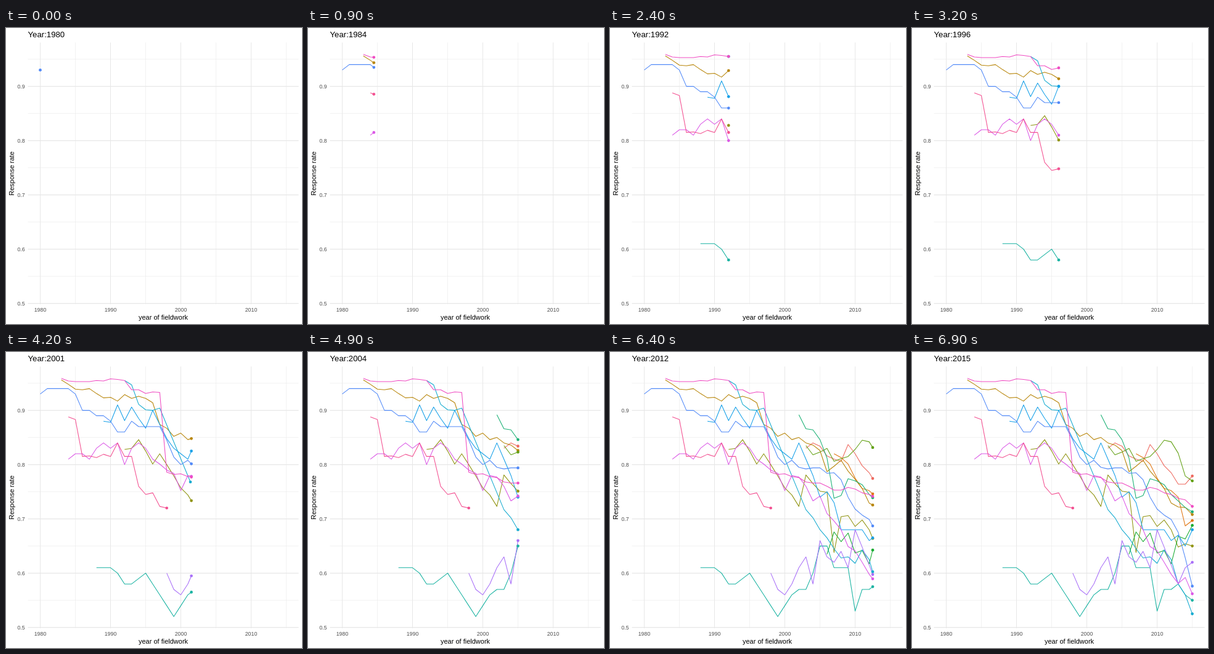
Recreate the animation shown at these times as an HTML page. Size 480 by 480 pixels, loop 10 s.

```html
<!DOCTYPE html>
<html lang="en">
<head>
<meta charset="utf-8">
<title>Response rate by year</title>
<style>
  html, body { margin: 0; width: 100%; height: 100%; overflow: hidden; background: #fff; }
  svg { display: block; width: 100vw; height: 100vh; font-family: "Liberation Sans", Arial, sans-serif; }
  .major { stroke: #e7e7e7; stroke-width: 1.07; }
  .minor { stroke: #e9e9e9; stroke-width: 0.6; }
  .tick { font-size: 8.8px; fill: #4d4d4d; }
  .label { font-size: 11px; text-anchor: middle; }
  .line { fill: none; stroke-width: 1.07; stroke-linejoin: round; }
</style>
</head>
<body>
<svg viewBox="0 0 480 480">
  <g id="grid"></g>
  <g id="lines"></g>
  <g id="dots"></g>
  <text id="title" x="35.5" y="15" font-size="13.2">Year:1980</text>
  <text class="label" x="255" y="473">year of fieldwork</text>
  <text class="label" transform="translate(13 236) rotate(-90)">Response rate</text>
</svg>
<script>
const FIRST = 1980, SPAN = 35, LAST_STEP = 69, STEP_MS = 100, LOOP_MS = 10000;
const PANEL = { left: 35.5, right: 474.5, top: 23.5, bottom: 448 };

const byId = id => document.getElementById(id);
const px = year => 55.5 + (year - FIRST) * 11.4;
const py = rate => 94.6 + (0.9 - rate) * 880;
const stepOf = year => Math.round((year - FIRST) * LAST_STEP / SPAN);

function add(parent, tag, attrs, text = '') {
  const el = document.createElementNS('http://www.w3.org/2000/svg', tag);
  for (const name in attrs) el.setAttribute(name, attrs[name]);
  el.textContent = text;
  return byId(parent).appendChild(el);
}

function gridX(year, kind) {
  const x = px(year);
  add('grid', 'line', { class: kind, x1: x, x2: x, y1: PANEL.top, y2: PANEL.bottom });
}
function gridY(rate, kind) {
  const y = py(rate);
  add('grid', 'line', { class: kind, x1: PANEL.left, x2: PANEL.right, y1: y, y2: y });
}
for (let year = 1985; year <= 2015; year += 10) gridX(year, 'minor');
for (let i = 0; i < 5; i++) gridY(0.55 + i / 10, 'minor');
for (let year = 1980; year <= 2010; year += 10) {
  gridX(year, 'major');
  add('grid', 'text', { class: 'tick', x: px(year), y: 460, 'text-anchor': 'middle' }, year);
}
for (let i = 5; i <= 9; i++) {
  gridY(i / 10, 'major');
  add('grid', 'text', { class: 'tick', x: 30.7, y: py(i / 10) + 3.1, 'text-anchor': 'end' }, (i / 10).toFixed(1));
}

// Rates are yearly, in thousandths; null marks a year without a survey.
const allSeries = [];
function series(color, start, rates) {
  const points = rates
    .map((rate, i) => ({ step: stepOf(start + i), x: px(start + i), y: py(rate / 1000), known: rate !== null }))
    .filter(p => p.known);
  allSeries.push({
    points,
    line: add('lines', 'path', { class: 'line', stroke: color }),
    dot: add('dots', 'circle', { r: 2.35, fill: color })
  });
}

series('#ee6a60', 2003, [830, 840, 834, 816, 810, 806, 837, 820, 798, 785, 764, 764, 779]);
series('#e07612', 2007, [820, 813, 801, 775, 756, 752, 740, 687, 697]);
series('#b8860b', 1983, [956, 948, 939, 938, 940, 931, 923, 924, 917, 929, 922, 926, 922, 914, 874, 867, 852,
  858, 846, 850, 840, 836, 826, 787, 797, 808, 788, 773, 756, 729, 722, 721, 708]);
series('#909412', 1992, [828, 830, 846, 825, 801, 820, 800, 779, 757, 744, 723, 781, 765, 751, 749, 638, 704,
  706, 686, 698, 680, 648, 654, 650]);
series('#62a014', 2003, [835, 818, 823, 830, 806, 811, 815, 828, 845, 842, 821, 779, 770]);
series('#18ab32', 2006, [635, 676, 658, 674, 637, 642, 617, 668, 663, 688]);
series('#1db176', 2002, [892, 866, 864, 846, 812, 738, 743, 774, 770, 763, 745, 733, 721, 713]);
series('#1ab3a2', 1988, [610, 610, 610, 600, 580, 580, 590, 600, 580, 560, 540, 520, 540, 560, 570, 570, 600,
  650, 650, 610, 610, 610, 530, 570, 570, 580, 560, 550]);
series('#16abd0', 1992, [955, 947, 911, 901, 900, 904, null, null, null, null, null, 717, 702, 680, 665, 645,
  628, 630, 618, 643, 625, 580, 560, 525]);
series('#16a0e8', 1989, [880, 878, 910, 881, 906, 885, 867, 900, 874, 848, 830, 820, 810, 840, 810, 780, 740,
  750, 730, 680, 680, 680, 680, 660, 670, 650, 680]);
series('#528af8', 1980, [930, 940, 940, 940, 940, 930, 900, 900, 890, 890, 880, 860, 860, 880, 870, 870, 870,
  870, 845, 814, 800, 808, 795, 792, 794, 794, 784, 785, 772, 740, 718, 707, 699, 675, 628, 576]);
series('#a970f8', 1998, [600, 570, 560, 580, 610, 630, 580, 660, 630, 620, 640, 610, 680, 648, 615, 580, 610, 620]);
series('#db58e6', 1984, [810, 820, 820, 810, 830, 840, 830, 840, 800, 830, 840, 830, 810, 801, 790, 784, 752,
  780, 777, 760, 733, 742, 710, 696, 680, 649, 641, 620, 598, 581, 592, 562]);
series('#ef4cc2', 1983, [959, 954, 953, 953, 953, 955, 954, 958, 957, 955, 938, 938, 931, 934, 933, 786, 782,
  783, 778, 776, 768, 766, 766, 760, 753, 753, 758, 755, 748, 745, 738, 735, 723]);
series('#f35292', 1984, [888, 883, 815, 816, 813, 819, 815, 840, 815, 815, 760, 745, 748, 723, 720]);

function reveal({ points, line, dot }, step) {
  const seen = points.filter(p => p.step <= step);
  dot.style.display = line.style.display = seen.length ? '' : 'none';
  if (!seen.length) return;
  let head = seen[seen.length - 1];
  const next = points[seen.length];
  if (next && step > head.step) {
    const f = (step - head.step) / (next.step - head.step);
    head = { x: head.x + (next.x - head.x) * f, y: head.y + (next.y - head.y) * f };
    seen.push(head);
  }
  line.setAttribute('d', 'M' + seen.map(p => `${p.x.toFixed(2)} ${p.y.toFixed(2)}`).join('L'));
  dot.setAttribute('cx', head.x);
  dot.setAttribute('cy', head.y);
}

let shown = -1;
function draw() {
  const step = Math.min(LAST_STEP, Math.floor(performance.now() % LOOP_MS / STEP_MS));
  if (step !== shown) {
    shown = step;
    byId('title').textContent = 'Year:' + Math.floor(FIRST + SPAN * step / LAST_STEP);
    allSeries.forEach(s => reveal(s, step));
  }
  requestAnimationFrame(draw);
}
draw();
</script>
</body>
</html>
```
